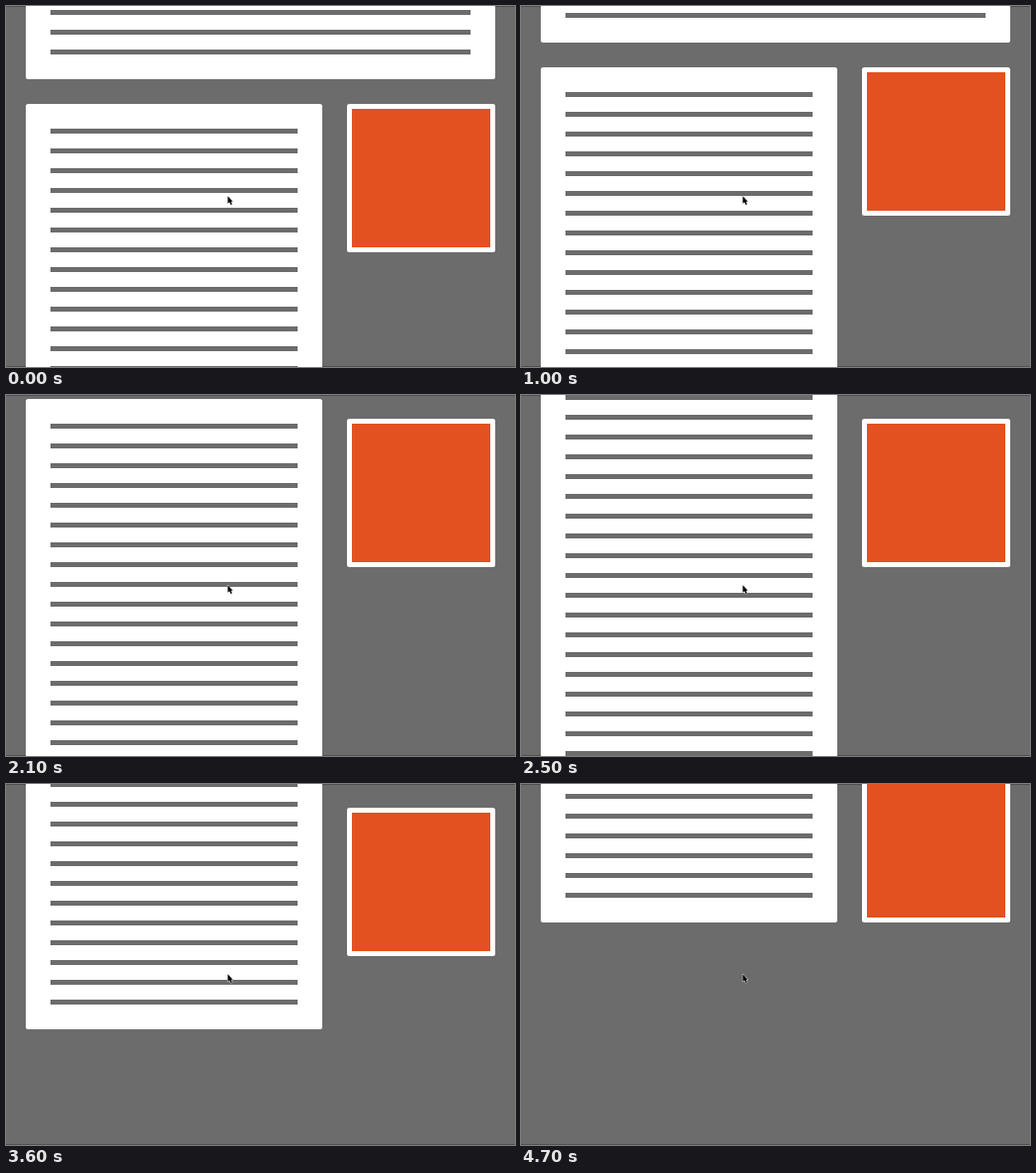
Write an HTML page that moves like this. It is 515 by 365 pixels and loops after 5000 ms.

```html
<!DOCTYPE html>
<html lang="en">
<head>
<meta charset="utf-8">
<title>Sticky sidebar</title>
<style>
  html, body { margin: 0; width: 100%; height: 100%; overflow: hidden; background: #6c6c6c; }
  svg { display: block; }
</style>
</head>
<body>
<svg width="515" height="365" viewBox="0 0 515 365">
  <rect width="515" height="365" fill="#6c6c6c"/>
  <path d="M0 .5H515M0 364.5H515" stroke="#505050"/>
  <g id="page"></g>
  <g id="sidebar">
    <rect x="345" width="150" height="150" rx="2.5" fill="#fff"/>
    <rect x="350" y="5" width="140" height="140" fill="#e35120"/>
  </g>
  <path d="M224.4 192.2V199.8L226.1 198.3L227.4 201L228.8 200.4L227.6 197.7H229.6Z"
        fill="#000" stroke="#fff" stroke-width="1" paint-order="stroke" stroke-linejoin="round"/>
</svg>
<script>
const LOOP = 5000, TICK = 100;
const PANEL = { top: 99, lines: 20 };
const BOX_SIZE = 150, STICKY_TOP = 24;
const panelHeight = lines => 35 + 20 * lines;

// Each wheel gesture: start time and pixels scrolled per tick.
const gestures = [
  { start: 600, deltas: [2, 4, 7, 10, 14, 17, 17, 14, 7] },
  { start: 2100, deltas: [3, 7, 11, 14, 17, 21, 21, 19, 14, 9, 3, 2] },
  { start: 3400, deltas: [11, 18, 24, 25, 22, 16, 9, 5, 3, 2] },
  { start: 4500, deltas: [8, 11, 7] }
];

const page = document.getElementById('page');
const sidebar = document.getElementById('sidebar');

function addRect(x, y, width, height, fill, rx = 0) {
  const rect = document.createElementNS('http://www.w3.org/2000/svg', 'rect');
  const attrs = { x, y, width, height, fill, rx };
  for (const key in attrs) rect.setAttribute(key, attrs[key]);
  page.append(rect);
}

function addPanel(top, width, lines) {
  addRect(20, top, width, panelHeight(lines), '#fff', 2.5);
  for (let i = 0; i < lines; i++) {
    addRect(45, top + 25 + 20 * i, width - 50, 5, '#6c6c6c');
  }
}

function scrollAt(time) {
  let scroll = 0;
  for (const { start, deltas } of gestures) {
    const ticks = Math.max(0, Math.floor((time - start) / TICK) + 1);
    scroll += deltas.slice(0, ticks).reduce((sum, d) => sum + d, 0);
  }
  return scroll;
}

function render(time) {
  const scroll = scrollAt(time);
  const top = PANEL.top - scroll;
  const bottom = top + panelHeight(PANEL.lines);
  const boxTop = Math.min(Math.max(top, STICKY_TOP), bottom - BOX_SIZE);
  page.setAttribute('transform', `translate(0 ${-scroll})`);
  sidebar.setAttribute('transform', `translate(0 ${boxTop})`);
}

addPanel(-21, 475, 3);
addPanel(PANEL.top, 300, PANEL.lines);

const begin = performance.now();
function frame() {
  render((performance.now() - begin) % LOOP);
  requestAnimationFrame(frame);
}
frame();
</script>
</body>
</html>
```
